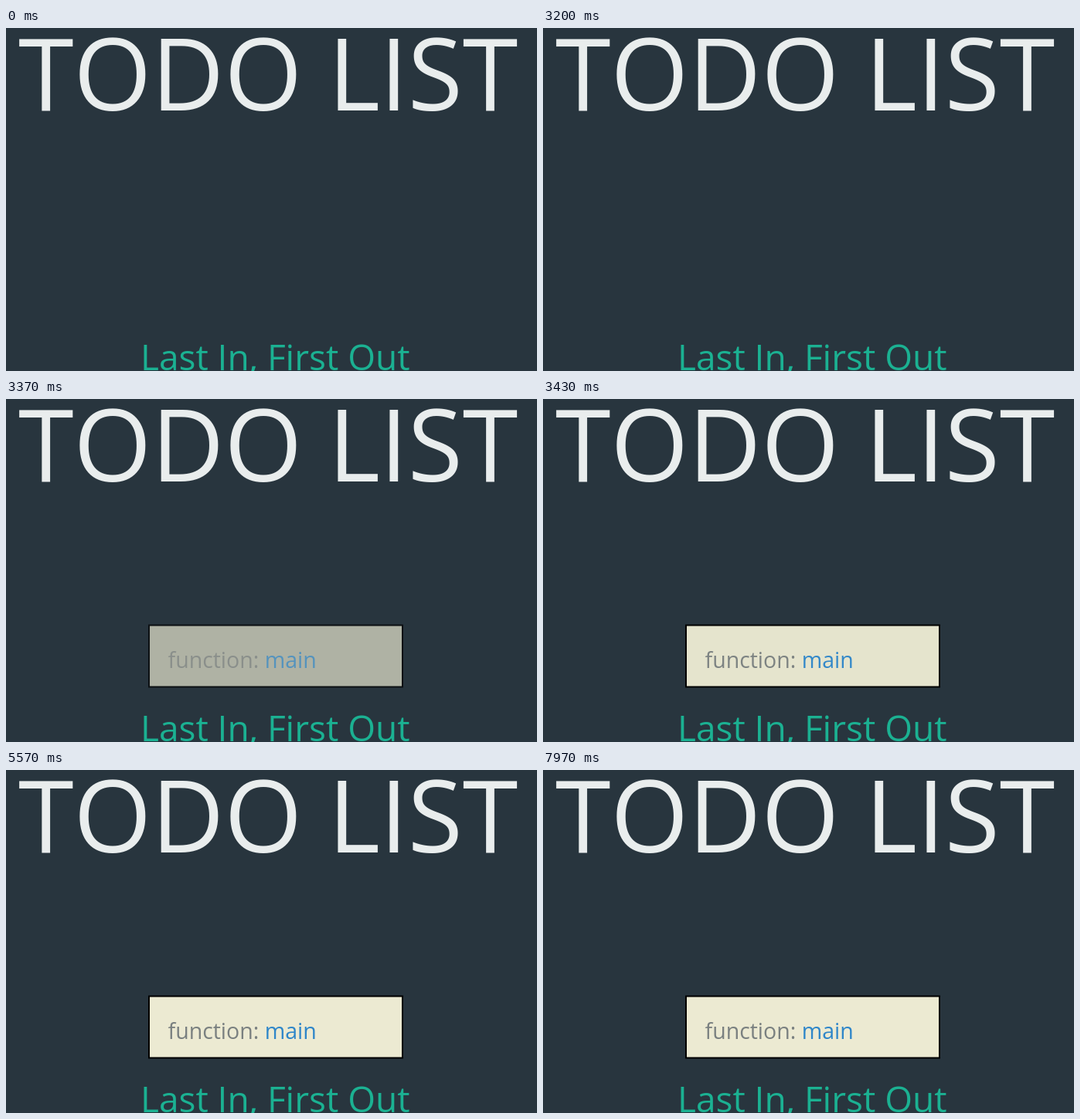
These frames come from a looping animation (687 by 445 pixels, 8000 ms). An HTML page:

```html
<!DOCTYPE html>
<html lang="en">
<head>
<meta charset="utf-8">
<title>Todo list</title>
<style>
  html, body { margin: 0; width: 100%; height: 100%; overflow: hidden; background: #28353e; }
  svg { display: block; width: 687px; height: 445px; font-family: "Open Sans", sans-serif; font-kerning: none; }
  #card > * { opacity: var(--fade, 0); }
</style>
</head>
<body>
<svg viewBox="0 0 687 445">
  <text x="15.9" y="106.6" font-size="129.3" fill="#e9eded">TODO LIST</text>
  <text x="174" y="443.8" font-size="46" fill="#1bb192">Last In, First Out</text>
  <g id="card">
    <rect x="185" y="293.5" width="328" height="80" fill="#ecead2" stroke="#000" stroke-width="2"/>
    <text x="209.5" y="348.5" font-size="28.5" fill="#7a8080">function: <tspan fill="#2e86c9">main</tspan></text>
  </g>
</svg>
<script>
  const LOOP = 8000, FADE_START = 3300, FADE_TIME = 160;
  const card = document.getElementById("card");
  const easeOut = u => 1 - (1 - u) ** 2;
  const start = performance.now();

  function draw(now) {
    const t = Math.max(0, now - start) % LOOP;
    const u = Math.min(1, Math.max(0, (t - FADE_START) / FADE_TIME));
    card.style.setProperty("--fade", easeOut(u));
    requestAnimationFrame(draw);
  }
  requestAnimationFrame(draw);
</script>
</body>
</html>
```
